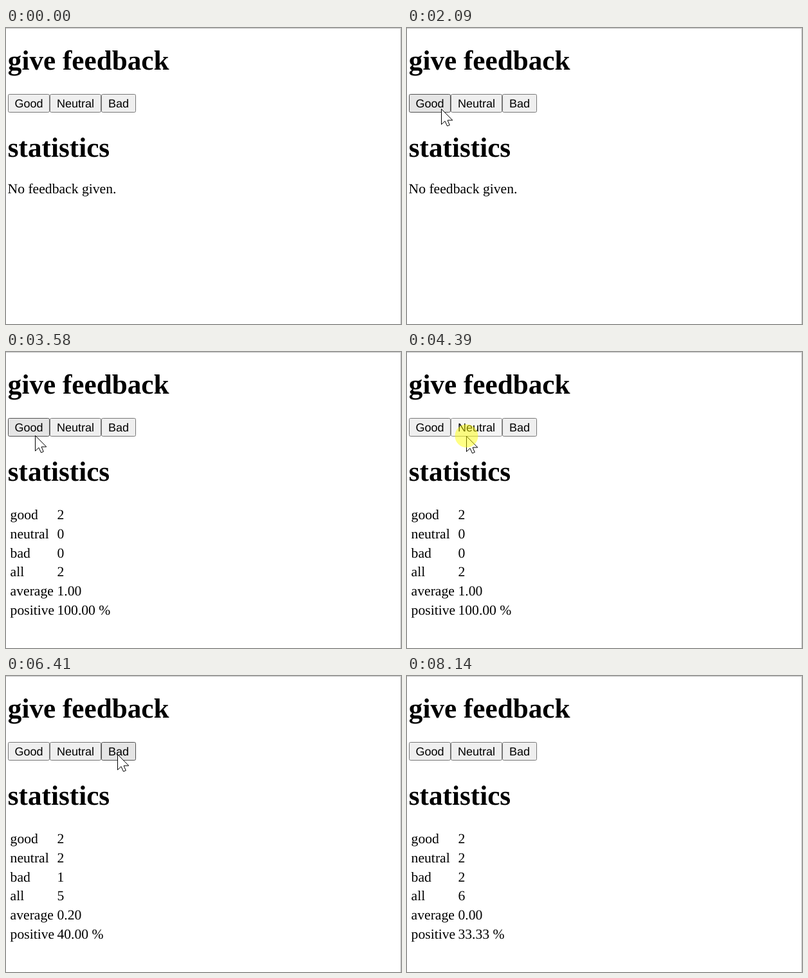
Write an HTML page that moves like this. It is 614 px wide and 462 px high and loops after 9.07 s.

```html
<!DOCTYPE html>
<html lang="en">
<head>
<meta charset="utf-8">
<title>Feedback</title>
<style>
  html, body { margin: 0; width: 100%; height: 100%; overflow: hidden; background: #fff; }
  svg { display: block; text-rendering: geometricPrecision; }
  text { font: 21.67px "Liberation Serif", "Times New Roman", serif; white-space: pre; }
  .title { font-size: 43.2px; font-weight: bold; }
  .button text { font: 18.06px "Liberation Sans", Arial, sans-serif; text-anchor: middle; }
  .button rect { fill: #efefef; stroke: #767676; }
  .button.hover rect { fill: #e5e5e5; stroke: #4f4f4f; }
  .button.active rect { fill: #f5f5f5; stroke: #8d8d8d; }
</style>
</head>
<body>
<svg width="614" height="462" viewBox="0 0 614 462">
  <path d="M0 .5H613.5V462" fill="none" stroke="#c3c3c3"/>
  <text class="title" x="2.8" y="65">give feedback</text>
  <text class="title" x="2.8" y="201">statistics</text>
  <text id="empty" x="2.5" y="258">No feedback given.</text>
  <g id="buttons"></g>
  <g id="table"></g>
  <g id="pointer">
    <path d="M0 0V24L5.5 18.8L9 26.5L12.8 25L9.6 17.5H17.3Z" fill="#fff" stroke="#000"/>
    <circle id="glow" cy="-.5" r="18" fill="#ff0" fill-opacity=".48"/>
  </g>
</svg>
<script>
const LOOP = 9070, STEP = 70;
const TOP = 103, BOTTOM = 132;
const $ = id => document.getElementById(id);
const show = (id, visible) => $(id).style.display = visible ? "" : "none";

function add(parent, tag, attrs, text = "") {
  const node = document.createElementNS("http://www.w3.org/2000/svg", tag);
  for (const name in attrs) node.setAttribute(name, attrs[name]);
  node.textContent = text;
  return parent.appendChild(node);
}

let edge = 3;
const buttons = Object.entries({ Good: 65, Neutral: 80, Bad: 54 }).map(([label, width]) => {
  const left = edge, right = edge += width;
  const node = add($("buttons"), "g", { class: "button" });
  add(node, "rect", { x: left + .5, y: TOP + .5, width: width - 1, height: BOTTOM - TOP - 1, rx: 2 });
  add(node, "text", { x: (left + right) / 2, y: 123.7 }, label);
  return { node, left, right };
});

const values = ["good", "neutral", "bad", "all", "average", "positive"].map((label, i) => {
  const y = 261 + i * 29.8;
  add($("table"), "text", { x: 6.6, y }, label);
  return add($("table"), "text", { x: 79.4, y });
});

// Each move slows down towards its end; "hide" is when the pointer leaves.
const onGood = [45, 130], onNeutral = [92, 131], onBad = [173, 122];
const moves = [
  { start: 860, steps: 2, from: [428, 490], to: [476, 346], hide: 1200 },
  { start: 1530, steps: 12, from: [551, 218], via: [315, 0], to: onGood, power: 3 },
  { start: 3910, steps: 5, from: onGood, to: onNeutral },
  { start: 5660, steps: 5, from: onNeutral, to: onBad },
  { start: 8000, steps: 3, from: onBad, to: [549, 240], hide: 8140 }
];

function pointerAt(t) {
  const move = moves.findLast(m => m.start <= t);
  if (!move || t >= move.hide) return null;
  const { start, steps, from, to, power = 2 } = move;
  const step = Math.min(Math.floor((t - start) / STEP) + 1, steps);
  const rest = (1 - step / steps) ** power, p = 1 - rest;
  return from.map((a, i) => {
    const b = to[i], via = move.via ? move.via[i] : (a + b) / 2;
    return Math.round(rest * rest * a + 2 * rest * p * via + p * p * b);
  });
}

// Clicks: press time, release time, button index.
const clicks = [[2720, 2900, 0], [3380, 3580, 0], [4390, 4670, 1],
                [5130, 5330, 1], [6210, 6410, 2], [6940, 7140, 2]];

function drawPointer(t) {
  const position = pointerAt(t);
  const pressed = clicks.some(([down, up]) => t >= down && t < up);
  const [x, y] = position || [-1, -1];
  show("pointer", position);
  show("glow", pressed);
  $("pointer").setAttribute("transform", `translate(${x + .5} ${y + .5})`);
  for (const { node, left, right } of buttons) {
    const over = x >= left && x < right && y >= TOP && y < BOTTOM;
    node.setAttribute("class", "button" + (over ? pressed ? " active" : " hover" : ""));
  }
}

function drawStatistics(t) {
  const count = index => clicks.filter(([, up, i]) => i === index && t >= up).length;
  const good = count(0), neutral = count(1), bad = count(2), all = good + neutral + bad;
  show("empty", !all);
  show("table", all);
  const average = ((good - bad) / all).toFixed(2);
  const positive = (100 * good / all).toFixed(2) + " %";
  [good, neutral, bad, all, average, positive].forEach((value, i) => values[i].textContent = value);
}

const begin = performance.now();
function tick() {
  const t = (performance.now() - begin) % LOOP;
  drawPointer(t);
  drawStatistics(t);
  requestAnimationFrame(tick);
}
tick();
</script>
</body>
</html>
```
